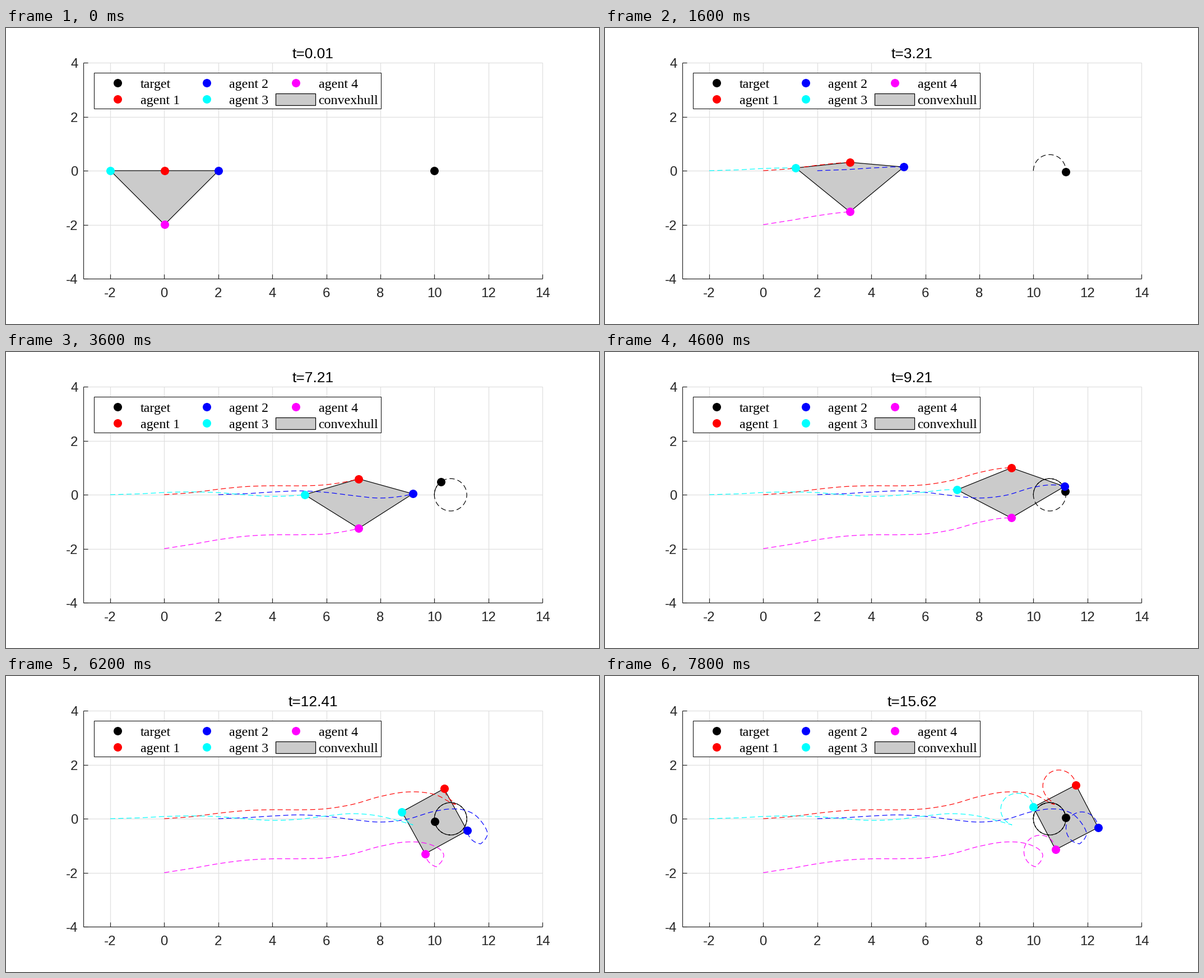
A matplotlib script that plays this animation: 1058 by 529 pixels, repeating every 8 s.

```python
import numpy as np
import matplotlib.pyplot as plt
from matplotlib.animation import FuncAnimation
from matplotlib.patches import Polygon, Rectangle

W, H, DPI = 1058, 529, 64
FRAMES, INTERVAL = 40, 200
STEPS = 40                     # simulation steps per frame
DT = 25 / 2499
CAPTURE = 11.25                # time at which the agents lock on
UNIT, X0, Y0 = 48.2, 282.3, 255.2
DARK, GRID, GREY = "#262626", "#dfdfdf", "#cbcbcb"
COLORS = ["black", "red", "blue", "cyan", "magenta"]

# Per agent: start x, heights at t = 0..8 while cruising, then (t, x, y) waypoints
AGENTS = [
    (0, [255, 251.5, 245.3, 240.6, 239, 239.2, 237.2, 229.3, 215.5],
     [(9, 715, 207.3), (9.6, 743, 207.8), (10.2, 770, 213.5),
      (10.81, 795, 227.5), (CAPTURE, 802, 229.5)]),
    (2, [255, 253.3, 250.2, 248.2, 250.8, 256.6, 261, 256, 242],
     [(8.7, 797, 237.5), (9.15, 817, 239.5), (9.61, 837, 248.5),
      (10.01, 851, 264), (10.45, 859, 281), (10.81, 855.5, 291),
      (CAPTURE, 847, 300)]),
    (-2, [255, 253.7, 251.1, 250, 251.3, 255.2, 258, 256, 250.2],
     [(9, 618, 246), (9.9, 661, 249.5), (10.81, 705, 260),
      (CAPTURE, 726, 266)]),
    (0, [351.5, 344, 335.5, 329.3, 326.7, 326.6, 325.2, 317.7, 304.5],
     [(9.1, 719, 296.5), (9.6, 743.5, 297.8), (9.98, 762, 303),
      (10.3, 775, 310.5), (10.58, 781, 320), (10.81, 778.5, 329),
      (CAPTURE, 768, 341)]),
]
# Direction of each agent's corner in the final square, in degrees
CORNERS = [90, 0, 180, 270]


def px(v):
    """Pixels to points."""
    return v * 72 / DPI


def sx(x):
    return X0 + UNIT * x


def sy(y):
    return Y0 - UNIT * y


def hermite(t, kt, kv):
    """Smooth curve through the keys kv at times kt."""
    slope = np.gradient(kv, kt)
    i = np.clip(np.searchsorted(kt, t, side="right") - 1, 0, len(kt) - 2)
    h = kt[i + 1] - kt[i]
    s = (t - kt[i]) / h
    return ((2 * s**3 - 3 * s**2 + 1) * kv[i] + (s**3 - 2 * s**2 + s) * h * slope[i]
            + (3 * s**2 - 2 * s**3) * kv[i + 1] + (s**3 - s**2) * h * slope[i + 1])


def orbit_path(t):
    return np.column_stack([sx(10.6 - 0.6 * np.cos(t)), sy(0.6 * np.sin(t))])


def locked_path(t, corner):
    tilt = np.interp(t, [CAPTURE, 14, 15.6], [16.5, 15.8, 17.5])
    a = np.radians(corner - tilt)
    offset = np.column_stack([np.cos(a), -np.sin(a)])
    return orbit_path(t) + 1.257 * UNIT * offset


def agent_path(t, start, heights, waypoints, corner):
    cruise = [(k, sx(start + 0.998 * k), y) for k, y in enumerate(heights)]
    kt, kx, ky = np.array(cruise + waypoints, float).T
    early = np.minimum(t, CAPTURE)
    free = np.column_stack([hermite(early, kt, kx), hermite(early, kt, ky)])
    gap = np.array([kx[-1], ky[-1]]) - locked_path(np.array([CAPTURE]), corner)
    fade = np.exp(-5 * np.maximum(t - CAPTURE, 0))[:, None]
    locked = locked_path(t, corner) + gap * fade
    return np.where((t < CAPTURE)[:, None], free, locked)


times = np.arange(STEPS * FRAMES) * DT
paths = [orbit_path(times)]
paths += [agent_path(times, *a, c) for a, c in zip(AGENTS, CORNERS)]

fig = plt.figure(figsize=(W / DPI, H / DPI), dpi=DPI, facecolor="white")
ax = fig.add_axes([0, 0, 1, 1])
ax.set_xlim(0, W)
ax.set_ylim(H, 0)
ax.axis("off")


def line(xs, ys, color, z, width=1.2):
    ax.plot(xs, ys, color=color, lw=px(width), zorder=z, solid_capstyle="butt")


def label(x, y, text, ha="center", size=24, font="Liberation Sans", color=DARK, z=3):
    return ax.text(x, y, text, ha=ha, va="baseline", fontsize=px(size),
                   family=font, color=color, zorder=z)


def dot(x, y, color, z):
    return ax.plot([x], [y], "o", ms=px(15), mew=0, color=color, zorder=z)[0]


# Grid, axes and ticks
left, right, top, bottom = sx(-3), sx(14), sy(4), sy(-4)
for v in range(-2, 15, 2):
    x = sx(v)
    line([x, x], [top, bottom], GRID, 1)
    line([x, x], [bottom, bottom - 8.5], DARK, 2)
    label(x, 481, str(v))
for v in range(-4, 5, 2):
    y = sy(v)
    line([left, right], [y, y], GRID, 1)
    line([left, left + 8.5], [y, y], DARK, 2)
    label(128.5, y + 9, str(v), ha="right")
line([left, right], [bottom, bottom], DARK, 2)
line([left, left], [top, bottom], DARK, 2)

# Legend
ax.add_patch(Rectangle((157, 80), 512, 64, fc="white", ec=DARK, lw=px(1.2), zorder=10))
entries = ["target", "agent 1", "agent 2", "agent 3", "agent 4", "convexhull"]
for i, entry in enumerate(entries):
    x, y = 199 + 159 * (i // 2), 98 + 29 * (i % 2)
    if i < 5:
        dot(x, y + 0.3, COLORS[i], 11)
    else:
        ax.add_patch(Rectangle((481, 117), 71, 21, fc=GREY, ec="black",
                               lw=px(1.2), zorder=11))
    label(x + 40.5, y + 8.7, entry, ha="left", font="Liberation Serif",
          color="black", z=11)

# Moving parts
title = label(547.5, 54, "", size=26.4, color="black")
hull = Polygon(np.zeros((4, 2)), closed=True, fc=GREY, ec="black",
               lw=px(1.2), joinstyle="round", zorder=4)
ax.add_patch(hull)
dashes = (0, (9.2 / 1.2, 5.3 / 1.2))
trails = [ax.plot([], [], color=c, lw=px(1.2), ls=dashes, dash_capstyle="butt",
                  zorder=5)[0] for c in COLORS]
dots = [dot(0, 0, c, 6) for c in COLORS]


def update(frame):
    n = STEPS * frame + 1
    title.set_text(f"t={n * DT:.2f}")
    for path, trail, mark in zip(paths, trails, dots):
        trail.set_data(path[:n + 1, 0], path[:n + 1, 1])
        mark.set_data(path[n:n + 1, 0], path[n:n + 1, 1])
    hull.set_xy([paths[i][n] for i in (1, 2, 4, 3)])
    return [title, hull, *trails, *dots]


anim = FuncAnimation(fig, update, frames=FRAMES, interval=INTERVAL,
                     repeat=True, repeat_delay=0, blit=False)
plt.show()
```
